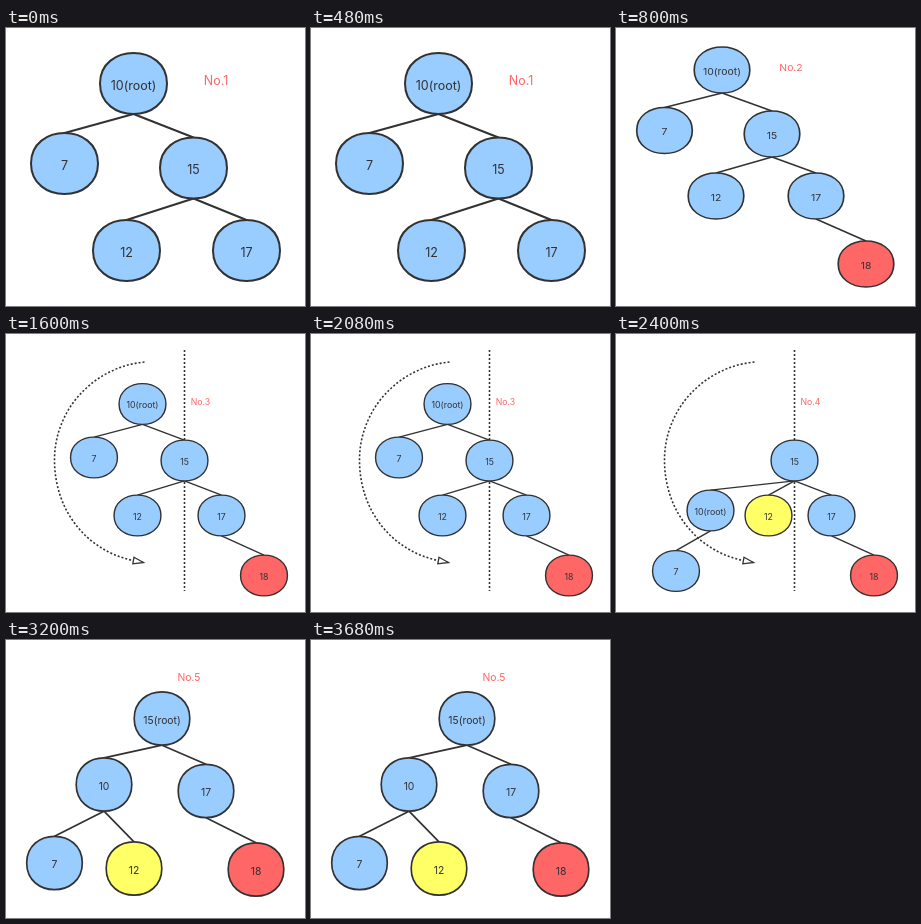
Recreate the animation shown at these times as an HTML page. Size 299 by 278 pixels, loop 4000 ms.

```html
<!DOCTYPE html>
<html lang="en">
<head>
<meta charset="utf-8">
<title>Tree rotation</title>
<style>
  html, body { margin: 0; width: 100%; height: 100%; overflow: hidden; background: #fff; }
  svg { display: block; }
  text { font: 12.5px Inter, sans-serif; text-anchor: middle; fill: #323232; }
  .label { fill: #ff6666; }
  .node path, .edge, .guide { stroke: #323232; stroke-width: 2; }
  .edge, .guide { fill: none; }
  .guide { stroke-dasharray: 2 2; }
  .arrow { fill: #fff; stroke: #323232; stroke-width: 1.3; }
</style>
</head>
<body>
<svg id="stage" width="299" height="278" viewBox="0 0 299 278"></svg>
<script>
const STEP = 800, RX = 33.5, RY = 30.5;
const BLUE = '#99ccff', RED = '#ff6666', YELLOW = '#ffff66';

// nodes: [text, x, y, parent index, fill]; scale applies to node shapes and text
const scenes = [
  { label: ['No.1', 210, 52], scale: [1, 1], nodes: [
    ['10(root)', 127.5, 55.5], ['7', 58.5, 135.5, 0], ['15', 187.5, 140, 0],
    ['12', 120.5, 222.5, 2], ['17', 240.5, 222.5, 2]] },
  { label: ['No.2', 175, 40], scale: [.83, .755], nodes: [
    ['10(root)', 106, 42], ['7', 48.5, 102.5, 0], ['15', 156, 106, 0],
    ['12', 100, 168, 2], ['17', 200, 168, 2], ['18', 250, 236, 4, RED]] },
  { label: ['No.3', 194.5, 68], scale: [.7, .67], guides: true, nodes: [
    ['10(root)', 136.5, 70], ['7', 88, 123.5, 0], ['15', 178.5, 126.5, 0],
    ['12', 131.5, 181.5, 2], ['17', 215.5, 181.5, 2], ['18', 258, 241.5, 4, RED]] },
  { label: ['No.4', 194.5, 68], scale: [.7, .67], guides: true, nodes: [
    ['15', 178.5, 126.5], ['10(root)', 94.5, 176.5, 0], ['12', 152.5, 181.5, 0, YELLOW],
    ['17', 215.5, 181.5, 0], ['7', 60, 237, 1], ['18', 258, 241.5, 3, RED]] },
  { label: ['No.5', 183, 37], scale: [.83, .875], nodes: [
    ['15(root)', 156, 78.5], ['10', 98, 144.5, 0], ['17', 200, 151, 0],
    ['7', 48.5, 223, 1], ['12', 128, 228.5, 1, YELLOW], ['18', 250, 229.5, 2, RED]] }
];

const bulge = RY * 4 / 3;
const blob = `M${-RX} 0C${-RX} ${-bulge} ${RX} ${-bulge} ${RX} 0C${RX} ${bulge} ${-RX} ${bulge} ${-RX} 0Z`;

const guides = `
  <path class="guide" style="stroke-width:1.6" d="M178.5 16V257"/>
  <path class="guide" style="stroke-width:1.6" d="M138.5 28C88 33 48.5 75 48.5 126C48.5 178 82 217 127 226.5"/>
  <path class="arrow" d="M128 223.3L137.5 228.5L126.8 229.8Z"/>`;

function drawScene({ label, scale: [sx, sy], nodes, guides: hasGuides }) {
  const place = (x, y) => `transform="translate(${x} ${y}) scale(${sx} ${sy})"`;
  const edges = nodes.map(([, x, y, parent]) => {
    if (parent === undefined) return '';
    const [, px, py] = nodes[parent];
    return `<path class="edge" style="stroke-width:${2 * (sx + sy) / 2}"
      d="M${px} ${py + RY * sy}L${x} ${y - RY * sy}"/>`;
  });
  const blobs = nodes.map(([text, x, y, , fill = BLUE]) =>
    `<g class="node" ${place(x, y)}><path d="${blob}" fill="${fill}"/><text y="6">${text}</text></g>`);
  const [title, lx, ly] = label;
  return `<g>${hasGuides ? guides : ''}${edges.join('')}${blobs.join('')}
    <g ${place(lx, ly)}><text class="label" y="4.5">${title}</text></g></g>`;
}

const stage = document.getElementById('stage');
stage.innerHTML = scenes.map(drawScene).join('');
const groups = [...stage.children];
const start = performance.now();

function render() {
  const elapsed = Math.max(0, performance.now() - start);
  const current = Math.floor(elapsed / STEP) % scenes.length;
  groups.forEach((group, i) => group.style.display = i === current ? '' : 'none');
  requestAnimationFrame(render);
}
render();
</script>
</body>
</html>
```
